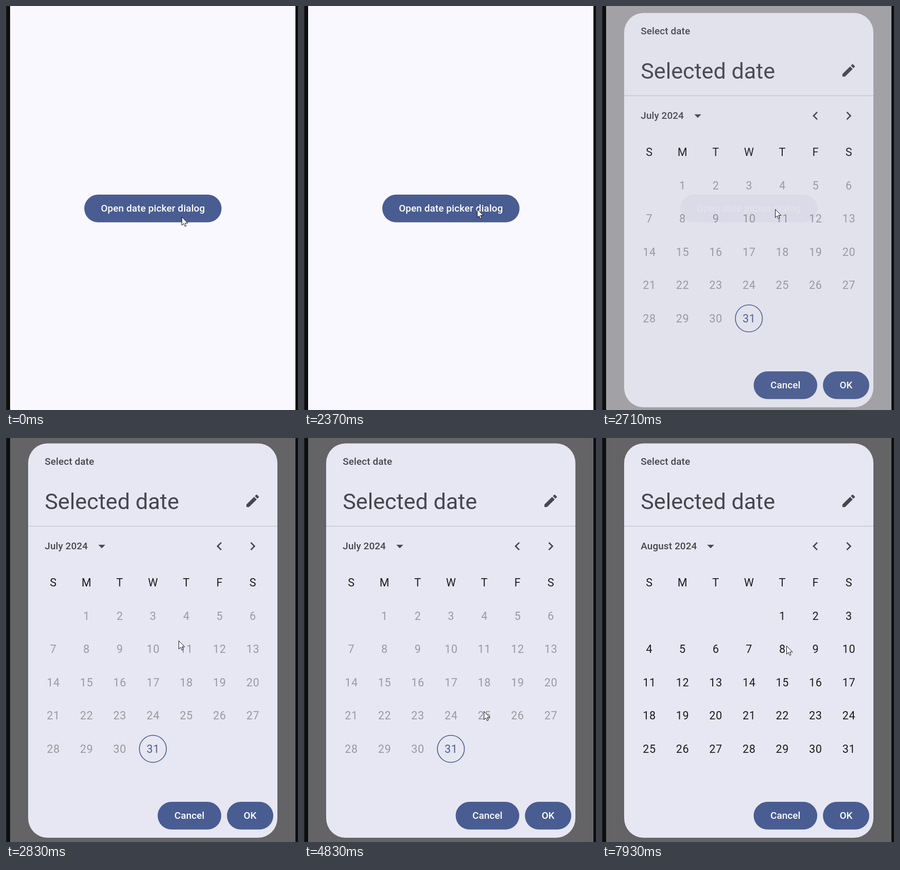
Recreate the animation shown at these times as an HTML page with a canvas. Size 567 by 784 pixels, loop 7990 ms.

```html
<!DOCTYPE html>
<html lang="en">
<head>
<meta charset="utf-8">
<title>Date picker dialog</title>
<style>
html, body { margin: 0; width: 567px; height: 784px; overflow: hidden; background: #faf8ff; }
canvas { display: block; }
</style>
</head>
<body>
<canvas id="stage" width="567" height="784"></canvas>
<script>
const W = 567, H = 784, LOOP = 7990, DP = 1.3457;
const PRIMARY = '#495d92', INK = '#1a1b21', MUTED = '#45464f', PANEL = '#e7e7f3';
const FAINT = 'rgba(26,27,33,.38)';
const OPEN_AT = 2630, PAGE_AT = 7050, TITLE_AT = 7130;
const PILL = 40 * DP, CELL = 48 * DP;
const GRID = { x: 91.9, y: 280.3 };

const stage = document.getElementById('stage').getContext('2d');
const layer = document.createElement('canvas');
layer.width = W;
layer.height = H;
const sheet = layer.getContext('2d');

const ICONS = {
  edit: new Path2D('M3 17.25V21h3.75L17.81 9.94l-3.75-3.75L3 17.25zM20.71 7.04c.39-.39.39-1.02 0-1.41l-2.34-2.34c-.39-.39-1.02-.39-1.41 0l-1.83 1.83 3.75 3.75 1.83-1.83z'),
  prev: new Path2D('M15.41 7.41L14 6l-6 6 6 6 1.41-1.41L10.83 12z'),
  next: new Path2D('M10 6L8.59 7.41 13.17 12l-4.58 4.59L10 18l6-6z'),
  drop: new Path2D('M7 10l5 5 5-5z')
};
const ARROW = new Path2D('M.5 .5V16.5L4 13.2 6.5 18.7 9 17.6 6.6 12.3H11.8z');

// Pointer moves; bow bends the path sideways
const HOME = { x: 341, y: 409 };
const MOVES = [
  { from: 150, to: 230, x: 340, y: 409 },
  { from: 770, to: 1030, x: 335, y: 463 },
  { from: 1170, to: 1370, x: 336, y: 394 },
  { from: 2630, to: 2830, x: 335, y: 393 },
  { from: 3310, to: 3830, x: 352, y: 410 },
  { from: 3910, to: 4170, x: 343, y: 472 },
  { from: 4250, to: 4830, x: 349, y: 530, bow: -16 },
  { from: 4910, to: 5450, x: 475, y: 213, bow: -70 },
  { from: 6580, to: 6730, x: 470, y: 239 },
  { from: 6730, to: 7930, x: 358, y: 403 }
];

const ramp = (t, a, b) => Math.max(0, Math.min(1, (t - a) / (b - a)));
const smooth = k => k * k * (3 - 2 * k);

function pointerAt(t) {
  let { x, y } = HOME;
  for (const m of MOVES) {
    const k = smooth(ramp(t, m.from, m.to));
    x += (m.x - x) * k + (m.bow || 0) * Math.sin(Math.PI * k);
    y += (m.y - y) * k;
  }
  return [Math.round(x), Math.round(y)];
}

function text(c, str, x, y, color, { size = 14, weight = 400, align = 'left', track = 0 } = {}) {
  c.font = `${weight} ${size * DP}px Roboto, sans-serif`;
  c.letterSpacing = track * DP + 'px';
  c.textAlign = align;
  c.fillStyle = color;
  c.fillText(str, x, y);
}

function label(c, str, x, y, color, align) {
  text(c, str, x, y, color, { weight: 500, align, track: .1 });
}

function icon(c, name, x, y, color = MUTED) {
  c.save();
  c.translate(x, y);
  c.scale(DP, DP);
  c.translate(-12, -12);
  c.fillStyle = color;
  c.fill(ICONS[name]);
  c.restore();
}

function roundBox(c, x, y, w, h, r, fill) {
  c.beginPath();
  c.roundRect(x, y, w, h, r);
  c.fillStyle = fill;
  c.fill();
}

function disc(c, x, y, r, fill) {
  c.beginPath();
  c.arc(x, y, r, 0, 7);
  c.fillStyle = fill;
  c.fill();
}

function button(c, str, x, y, w, glow) {
  roundBox(c, x, y, w, PILL, PILL / 2, PRIMARY);
  if (glow) roundBox(c, x, y, w, PILL, PILL / 2, glow);
  label(c, str, x + w / 2, y + 33.4, '#fff', 'center');
}

function pressGlow(c, t) {
  const a = .14 * (1 - ramp(t, 1850, 2170));
  if (t < 1510 || !a) return null;
  const x = 336 - 51 * ramp(t, 1510, 1960);
  const g = c.createRadialGradient(x, 393, 0, x, 393, 20 + (t - 1510) / 2);
  g.addColorStop(0, `rgba(255,255,255,${a})`);
  g.addColorStop(.6, `rgba(255,255,255,${a * .8})`);
  g.addColorStop(1, 'rgba(255,255,255,0)');
  return g;
}

function nextRipple(c, t) {
  const grow = .4 + .6 * ramp(t, 6330, 6600);
  const a = .062 * (1 - ramp(t, 6760, 7040));
  if (t < 6330 || !a) return;
  disc(c, 479, 210, 27 * grow, `rgba(27,27,33,${a})`);
  disc(c, 479, 210, 19 * grow, `rgba(27,27,33,${a / 3})`);
}

function dayGrid(c, august) {
  const put = (str, cell, color) => text(
    c, str, GRID.x + cell % 7 * CELL, GRID.y + Math.floor(cell / 7) * CELL + 7.7,
    color, { size: 16, align: 'center', track: .5 });

  [...'SMTWTFS'].forEach((d, i) => put(d, i, INK));
  const first = august ? 4 : 1;
  for (let d = 1; d <= 31; d++) {
    const today = !august && d === 31;
    put(d, 6 + first + d, august ? INK : today ? PRIMARY : FAINT);
  }
  if (!august) {
    c.beginPath();
    c.arc(285.2, GRID.y + 5 * CELL, 26.2, 0, 7);
    c.strokeStyle = PRIMARY;
    c.lineWidth = 1.6;
    c.stroke();
  }
}

function dialog(c, t) {
  c.clearRect(0, 0, W, H);
  roundBox(c, 43, 10.5, 484, 765.3, 28 * DP, PANEL);
  label(c, 'Select date', 75.3, 51.7, MUTED);
  text(c, 'Selected date', 75.3, 137.7, MUTED, { size: 32 });
  icon(c, 'edit', 479, 122);
  c.fillStyle = '#c6c6d0';
  c.fillRect(43, 170.5, 484, DP);

  const named = t >= TITLE_AT;
  label(c, named ? 'August 2024' : 'July 2024', 75.3, 216.2, MUTED);
  icon(c, 'drop', named ? 211 : 186, 210);
  nextRipple(c, t);
  const arrows = t < 2710 ? 'rgba(69,70,79,.38)' : MUTED;
  icon(c, 'prev', 414.3, 210, arrows);
  icon(c, 'next', 479, 210, arrows);

  dayGrid(c, t >= PAGE_AT);
  button(c, 'Cancel', 294.5, 706, 123.5);
  button(c, 'OK', 429, 706, 90);
}

function overlay(c, t) {
  const k = ramp(t, 2540, 2830), rest = 1 - k;
  c.fillStyle = `rgba(0,0,0,${.6 * k})`;
  c.fillRect(0, 0, W, H);
  dialog(sheet, t);
  c.globalAlpha = 1 - rest ** 3;
  c.drawImage(layer, 0, Math.round(17 * rest * rest));
  c.globalAlpha = 1;
}

function pointer(c, t) {
  c.save();
  c.translate(...pointerAt(t));
  c.fillStyle = '#fff';
  c.fill(ARROW);
  c.strokeStyle = '#111';
  c.stroke(ARROW);
  c.restore();
}

function bezel(c) {
  c.fillStyle = '#0d0e10';
  c.fillRect(0, 0, 8, H);
  c.fillRect(562, 0, 5, H);
  c.fillStyle = '#2a2b2d';
  c.fillRect(0, 0, 1, H);
}

function draw(t) {
  const c = stage;
  c.fillStyle = '#faf8ff';
  c.fillRect(0, 0, W, H);
  button(c, 'Open date picker dialog', 152, 366, 266.5, pressGlow(c, t));
  if (t >= OPEN_AT) overlay(c, t);
  bezel(c);
  pointer(c, t);
}

const start = performance.now();
function tick() {
  draw((performance.now() - start) % LOOP);
  requestAnimationFrame(tick);
}
tick();
</script>
</body>
</html>
```
